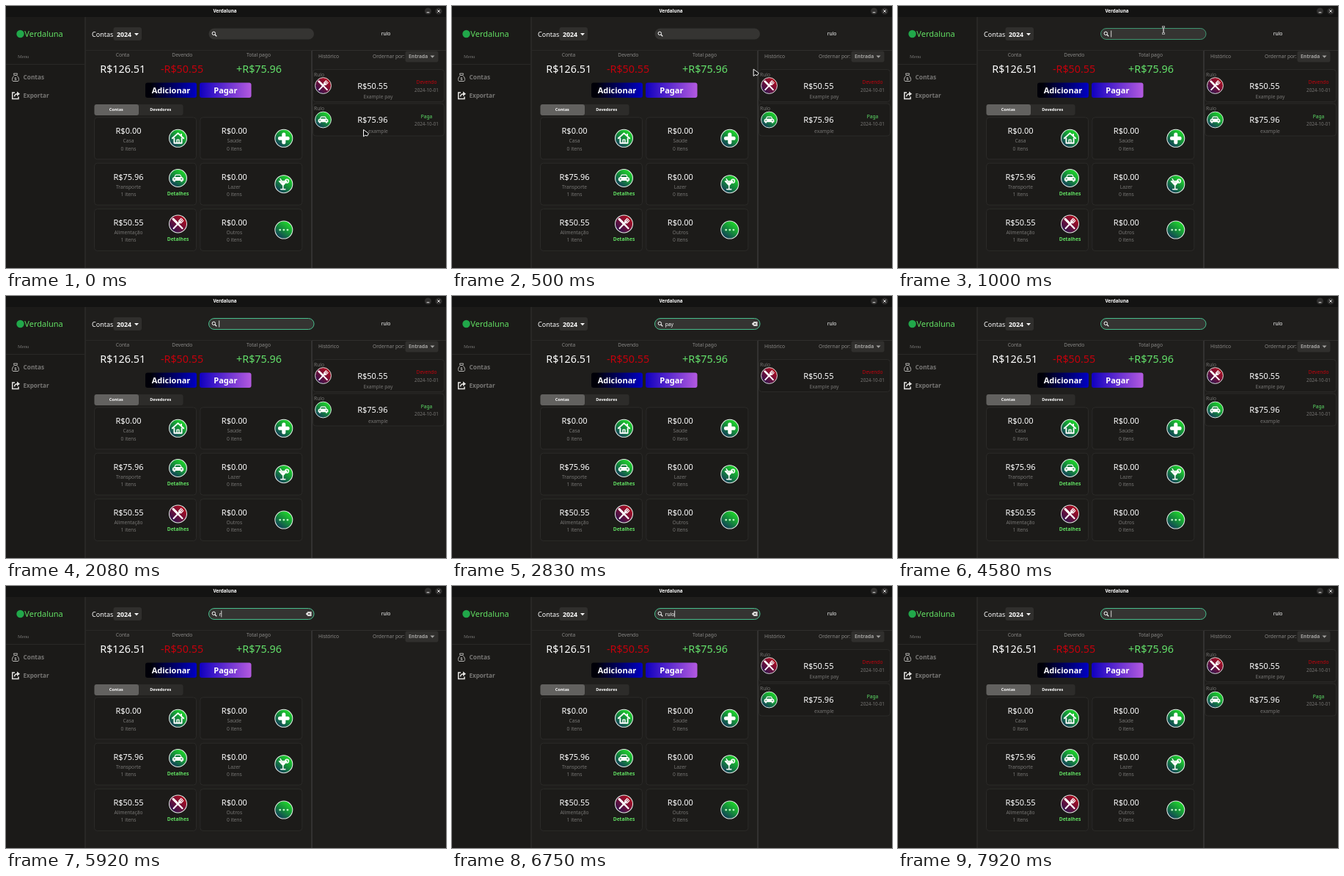
These frames come from a looping animation (600 px wide and 357 px high, 8000 ms). An HTML page:

```html
<!DOCTYPE html>
<html lang="pt">
<head>
<meta charset="utf-8">
<title>Verdaluna</title>
<style>
html, body { margin: 0; width: 100%; height: 100%; overflow: hidden; background: #1f1e1c; }
svg { display: block; width: 600px; height: 357px; font-family: "Noto Sans", sans-serif; }
.b { font-weight: 700; }
.m { text-anchor: middle; }
</style>
</head>
<body>
<svg id="stage" viewBox="0 0 600 357">
  <defs>
    <linearGradient id="green" x1="0.15" y1="0.9" x2="0.75" y2="0.1">
      <stop offset="0" stop-color="#123a5c"/><stop offset=".5" stop-color="#14883c"/><stop offset="1" stop-color="#1fd32c"/>
    </linearGradient>
    <linearGradient id="red" x1="0.1" y1="0.9" x2="0.8" y2="0.1">
      <stop offset="0" stop-color="#2c1450"/><stop offset=".5" stop-color="#6e0f3a"/><stop offset="1" stop-color="#b00c1c"/>
    </linearGradient>
    <linearGradient id="add"><stop offset=".1" stop-color="#000008"/><stop offset="1" stop-color="#0000c4"/></linearGradient>
    <linearGradient id="pay"><stop offset="0" stop-color="#1000c0"/><stop offset="1" stop-color="#b45ae0"/></linearGradient>
    <g id="house" fill="none" stroke="#fff" stroke-width="1.8" stroke-linejoin="round" stroke-linecap="round">
      <path d="M-7.5 0 0-6.8 7.5 0M-5 0V6.3H5V0M4.5-5.5V-3.5"/><path d="M-1.4 6V1.8H1.4V6" stroke-width="1.4"/>
    </g>
    <path id="plus" d="M0-5.2V5.2M-5.2 0H5.2" stroke="#fff" stroke-width="5" stroke-linecap="round"/>
    <g id="car">
      <path d="M-7.4 1.2C-7.4-.8-6.3-1-5.2-1.3L-3.7-4.2Q-3.4-4.8-2.6-4.8H2.6Q3.4-4.8 3.7-4.2L5.2-1.3C6.3-1 7.4-.8 7.4 1.2V3.4H6V4.9H3.6V3.4H-3.6V4.9H-6V3.4H-7.4Z" fill="#fff"/>
      <path d="M-3.9-1.5-2.7-3.6H2.7L3.9-1.5ZM-5.8.6H-3.6V1.7H-5.8ZM3.6.6H5.8V1.7H3.6Z" fill="#147a3c"/>
    </g>
    <g id="drink" fill="none" stroke="#fff" stroke-width="1.4" stroke-linecap="round" stroke-linejoin="round">
      <path d="M-6.2-3.8H4L-1 1.8ZM-1 1.8V6.6M-4 6.8H2M-2.5-3.8-4.6-7"/>
      <path d="M-4.2-2.5H2.2L-1 1Z" fill="#fff"/><circle cx="4.2" cy="-4" r="2.3"/>
    </g>
    <g id="food" stroke="#fff" stroke-linecap="round">
      <path d="M-5.8 6 3-3" stroke-width="2"/><path d="M2.4-2.4 6-6M1.2-4 4.4-7.2M4-1.2 7.2-4.4M1.2-4Q1-1 4-1.2" fill="#fff" stroke-width="1.3"/>
      <path d="M5.8 6-1-1" stroke-width="2.2"/><path d="M-6.3-6.3 .3.3" stroke-width="3"/>
    </g>
    <g id="dots" fill="#b8f5c0"><circle cx="-5" r="1.4"/><circle r="1.4"/><circle cx="5" r="1.4"/></g>
  </defs>
</svg>
<script>
const stage = document.getElementById('stage');
const rect = (x, y, w, h, r, fill, stroke = 'none') =>
  `<rect x="${x}" y="${y}" width="${w}" height="${h}" rx="${r}" fill="${fill}" stroke="${stroke}"/>`;
const text = (x, y, size, fill, s, cls = '') =>
  `<text x="${x}" y="${y}" font-size="${size}" fill="${fill}" class="${cls}">${s}</text>`;
const path = (d, stroke, w = 1, fill = 'none') =>
  `<path d="${d}" stroke="${stroke}" stroke-width="${w}" fill="${fill}"/>`;
const badge = (x, y, r, icon) => `<g transform="translate(${x} ${y}) scale(${r / 12})">
  <circle r="11.7" fill="url(#${icon === 'food' ? 'red' : 'green'})" stroke="#e4ece8" stroke-width="1"/><use href="#${icon}"/></g>`;

const grey = '#777674', line = '#302f2d', dim = '#8a8987', green = '#62e063';

function card(x, y, value, label, count, icon) {
  const cx = x + 46.5;
  return rect(x, y, 139, 57, 4, '#1c1b19', '#2b2a28') +
    text(cx, y + 22.3, 11, '#fff', value, 'm') +
    text(cx, y + 34.5, 6.7, grey, label, 'm') +
    text(cx, y + 44.8, 6.7, grey, count + ' itens', 'm') +
    badge(x + 114, y + (count ? 20.3 : 28.5), 12.3, icon) +
    (count ? text(x + 114, y + 43.3, 6.7, green, 'Detalhes', 'b m') : '');
}

function entry(id, y, value, note, state, color, icon) {
  return `<g id="${id}">` + rect(418.5, y, 179, 44, 4, '#1c1b19', '#2b2a28') +
    text(420, y + 9, 6.7, grey, 'Rulo') + badge(432.5, y + 22, 11.2, icon) +
    text(499.8, y + 26, 11, '#fff', value, 'm') + text(507.5, y + 39.5, 6.7, grey, note, 'm') +
    text(573.5, y + 19.5, 6.7, color, state, 'm') + text(573.5, y + 30, 6.3, grey, '2024-10-01', 'm') + '</g>';
}

stage.insertAdjacentHTML('beforeend', [
  rect(0, 0, 600, 357, 0, '#1f1e1c'),
  rect(0, 15, 108, 342, 0, '#1b1a18'),
  rect(0, 0, 600, 15, 0, '#131312'),
  text(298.5, 9.3, 6.3, '#fff', 'Verdaluna', 'b m'),
  '<circle cx="575.5" cy="7" r="4.6" fill="#302f2e"/><circle cx="590" cy="7" r="4.6" fill="#302f2e"/>',
  path('M573.7 8.8H577.3M588.3 5.3 591.7 8.7M591.7 5.3 588.3 8.7', '#fff', .9),
  path('M108 15V357', '#343331'), path('M0 79.5H107M108 60.5H417', '#292826'),
  path('M417 61V357', '#3b3a38', 1.5), path('M417 60.5H600', line),

  '<circle cx="19.5" cy="38" r="5.2" fill="#21a84a"/>',
  text(25.3, 42, 11, green, 'Verdaluna'),
  `<text x="16" y="70.5" font-size="6.5" fill="${grey}" font-family="Liberation Serif, serif">Menu</text>`,
  path('M11.5 94.5C8.3 97 7.5 102 9.8 102.5H16.2C18.5 102 17.7 97 14.5 94.5ZM11.2 94.5 10.5 92H15.5L14.8 94.5', '#b8b7b5', 1),
  text(13, 100.6, 6, '#b8b7b5', '$', 'b m'),
  text(23.5, 100, 8.3, grey, 'Contas', 'b'),
  path('M12 118H8.7V126.5H17V123.5M11.5 123.5Q11.7 119.7 16 119.7', '#e4e3e1', 1.5),
  path('M15 116.5 19 119.7 15 122.9Z', 'none', 0, '#e4e3e1'),
  text(23.5, 125, 8.1, grey, 'Exportar', 'b'),

  text(117, 41.5, 9, '#fff', 'Contas'),
  rect(146.5, 29, 38.5, 18, 3, '#302f2d'), text(151, 41.5, 8.8, '#fff', '2024', 'b'),
  path('M175 37H181L178 40.2Z', 'none', 0, '#fff'),
  '<rect id="field" x="276.5" y="30.5" width="143.5" height="15" rx="7.5" fill="#353432"/>',
  '<circle cx="283.3" cy="37.3" r="2.2" fill="none" stroke="#fff"/>', path('M285 39 287.3 41.3', '#fff', 1.2),
  '<text id="query" x="290.7" y="40.6" font-size="6.7" fill="#fff"></text>',
  '<path id="caret" d="M290.7 33.5V42.5" stroke="#fff" stroke-width=".8"/>',
  '<g id="clear"><path d="M408.8 38 411.5 35H416.5V41H411.5Z" fill="#e8e7e5"/><path d="M411.8 36.5 414.8 39.5M414.8 36.5 411.8 39.5" stroke="#353432" stroke-width=".9"/></g>',
  text(518, 40.3, 6.7, '#fff', 'rulo', 'm'),

  text(159, 68.5, 6.7, dim, 'Conta', 'm'), text(240.3, 68.5, 6.7, dim, 'Devendo', 'm'), text(344.5, 68.5, 6.7, dim, 'Total pago', 'm'),
  text(159.2, 91.2, 14.3, '#fff', 'R$126.51', 'm'),
  text(240, 91.2, 14.3, '#c4000c', '-R$50.55', 'm'),
  text(345, 91.2, 14.3, '#63e06a', '+R$75.96', 'm'),
  rect(190, 104.5, 70, 20.5, 3, 'url(#add)'), text(225, 119, 11, '#fff', 'Adicionar', 'b m'),
  rect(264, 104.5, 70.5, 20.5, 3, 'url(#pay)'), text(299.3, 119, 11, '#fff', 'Pagar', 'b m'),
  rect(120.5, 134, 121, 15, 3, '#2d2c2a'), rect(120.5, 134, 60.5, 15, 3, '#62615f'),
  text(150.3, 143.4, 5.5, '#fff', 'Contas', 'b m'), text(210.7, 143.4, 5.5, '#fff', 'Devedores', 'b m'),

  card(120.5, 151.8, 'R$0.00', 'Casa', 0, 'house'),
  card(264.8, 151.8, 'R$0.00', 'Saúde', 0, 'plus'),
  card(120.5, 214.2, 'R$75.96', 'Transporte', 1, 'car'),
  card(264.8, 214.2, 'R$0.00', 'Lazer', 0, 'drink'),
  card(120.5, 276.6, 'R$50.55', 'Alimentação', 1, 'food'),
  card(264.8, 276.6, 'R$0.00', 'Outros', 0, 'dots'),

  text(426, 71.3, 6.7, dim, 'Histórico'), text(500, 71.3, 6.7, dim, 'Ordernar por:'),
  rect(544.5, 61.5, 45, 15, 3, '#302f2d'), text(549, 71.3, 6.7, '#a3a2a0', 'Entrada', 'b'),
  path('M578.5 67.5H584.5L581.5 70.7Z', 'none', 0, '#a3a2a0'),
  entry('owed', 86.5, 'R$50.55', 'Example pay', 'Devendo', '#c4000c', 'food'),
  entry('paid', 133, 'R$75.96', 'example', 'Paga', '#5ee068', 'car'),

  '<path id="arrow" d="M0 0V9.3L2.3 7.6 5 8.5 7 5.3Z" fill="#111" stroke="#fff" stroke-width="1" stroke-linejoin="round"/>',
  '<g id="beam" fill="none"><path d="M360-0V0M-2-4.5H2M0-4.5V4.5M-2 4.5H2" stroke="#fff" stroke-width="2"/><path d="M-1.5-4.5H1.5M0-4.5V4.5M-1.5 4.5H1.5" stroke="#111" stroke-width=".8"/></g>'
].join(''));

const $ = id => document.getElementById(id);
const show = (id, on) => $(id).style.display = on ? '' : 'none';
const LOOP = 8000, FOCUS = 880, TYPING = 1920;
const edits = [[FOCUS, ''], [2250, 'p'], [2420, 'pa'], [2580, 'pay'], [3920, 'pa'], [4170, 'p'], [4330, ''],
  [5920, 'r'], [6250, 'ru'], [6420, 'rul'], [6580, 'rulo'], [7170, 'r'], [7750, '']];
const within = (t, a, b) => t >= a && t < b;

function draw(t) {
  const focused = t >= FOCUS;
  const [since, query] = edits.filter(e => e[0] <= t).pop() || [0, ''];
  $('query').textContent = query;
  const glow = Math.min(1, Math.max(0, (t - FOCUS) / 300));
  $('field').setAttribute('stroke', focused ? `rgba(72,190,140,${.55 + .45 * glow})` : 'none');
  show('clear', query);
  const blink = (t - since) % 1200;
  show('caret', focused && !within(blink, 220, 720));
  $('caret').setAttribute('transform', `translate(${query ? $('query').getComputedTextLength() + .3 : 0} 0)`);

  const empty = within(t, 3830, 4400) || within(t, 5920, 6250);
  show('owed', !empty);
  show('paid', !empty && !within(t, 2580, 3830));

  const u = Math.min(1, Math.max(0, (t - 60) / 770)), k = u * u * (3 - 2 * u);
  const x = 487.5 - 125.5 * k, y = 168.5 - 135.5 * k;
  const overField = y < 45 && x < 420;
  show('arrow', !overField);
  show('beam', overField && t < TYPING);
  $('arrow').setAttribute('transform', `translate(${x} ${y})`);
  $('beam').setAttribute('transform', `translate(${x} ${y})`);
}

const start = performance.now();
function tick() {
  draw((performance.now() - start) % LOOP);
  requestAnimationFrame(tick);
}
tick();
</script>
</body>
</html>
```
